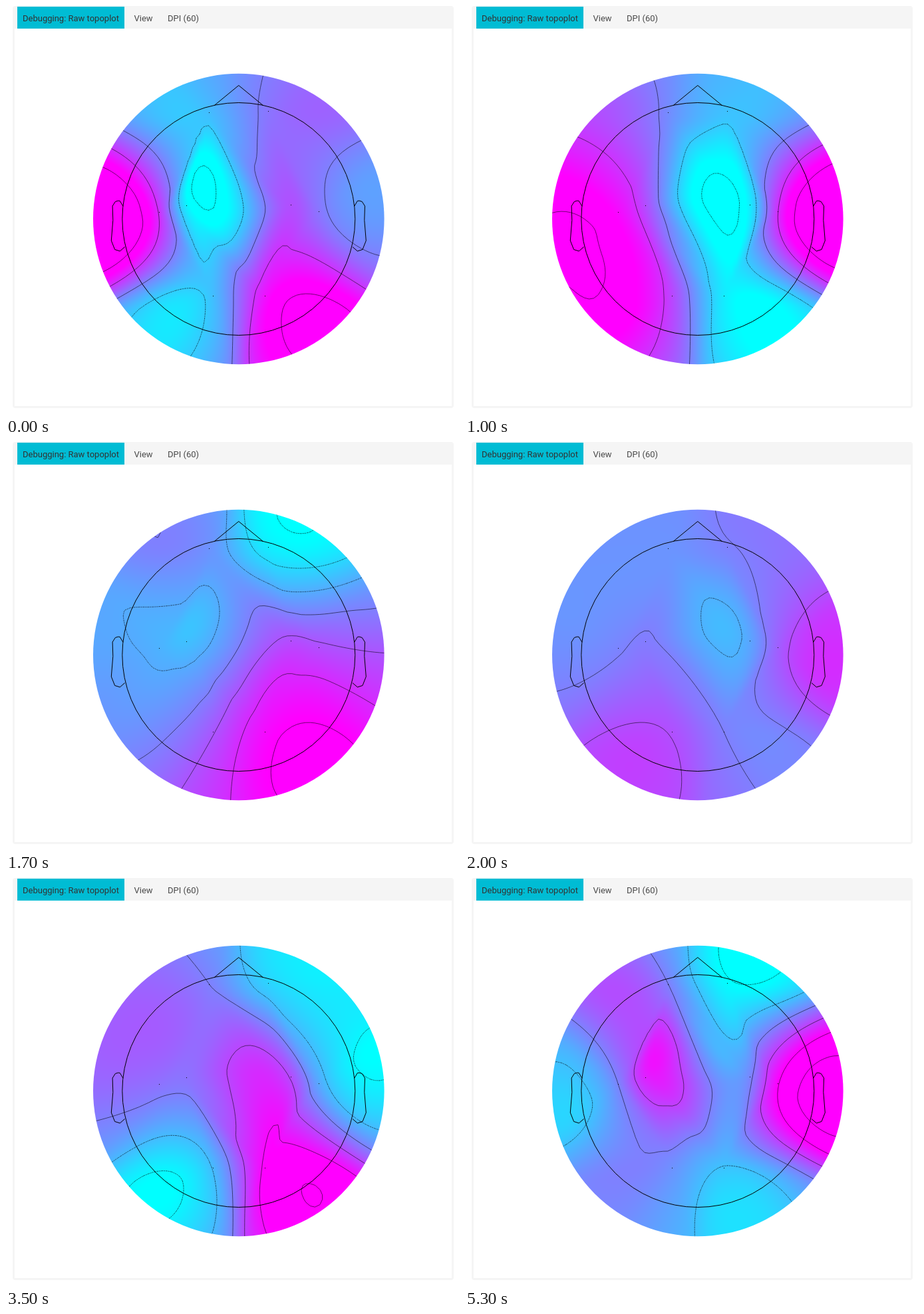
These frames come from a looping animation (681 by 614 pixels, 5400 ms). An HTML page with a canvas:

```html
<!DOCTYPE html>
<html lang="en">
<head>
<meta charset="utf-8">
<title>Raw topoplot</title>
<style>
  html, body { margin: 0; width: 100%; height: 100%; overflow: hidden; background: #fff; }
  .panel { position: absolute; left: 10px; top: 0; width: 663px; height: 605px; border-radius: 4px; background: #f5f5f5; }
  .body { position: absolute; left: 3px; top: 34px; width: 657px; height: 568px; background: #fff; }
  .tab { position: absolute; top: 1px; height: 33px; font: 13px/35px Roboto, sans-serif; color: #4a4a4a; white-space: nowrap; }
  .active { left: 7px; width: 153px; padding-left: 8px; background: #00bcd4; color: #333; }
  canvas { position: absolute; left: 0; top: 0; }
</style>
</head>
<body>
<div class="panel">
  <div class="tab active">Debugging: Raw topoplot</div>
  <div class="tab" style="left:182.5px">View</div>
  <div class="tab" style="left:233px">DPI (60)</div>
  <div class="body"></div>
</div>
<canvas id="stage" width="681" height="614"></canvas>
<script>
const ctx = document.getElementById('stage').getContext('2d');
const CX = 349.8, CY = 320.5, HEAD = 175, SKIRT = 218.8;
const X0 = CX - SKIRT, Y0 = CY - SKIRT, SIZE = 2 * SKIRT, N = 64;

// Sensor pairs: half distance, height, tilt.
const pairs = [[44.5, 159, 1], [78.6, 300, 0.5], [119.8, 310, 0.5], [39, 436.6, 0.1]];
const sensors = pairs.flatMap(([d, y, tilt]) => [[CX + 0.4 - d, y + tilt], [CX + 0.4 + d, y - tilt]]);

// Twelve outer points let the field run on past the sensors.
const RING = 1.1 * HEAD + 145;
const ring = Array.from({ length: 12 }, (_, i) => {
  const a = i * Math.PI / 6;
  return [CX + RING * Math.cos(a), CY + RING * Math.sin(a)];
});
const pts = [...sensors, ...ring];

// Sensor readings (percent of the colour range, left and right in turn) and contour spacing.
const keys = [
  { t: 0,    v: [-24, 4, -46, 19, 28, 5, -24, 42],    step: 30 },
  { t: 1000, v: [-5, -26, 19, -44, 46, 29, 22, -42],  step: 30 },
  { t: 1700, v: [-8, -42, -25, 20, -20, 20, 16, 45],  step: 17 },
  { t: 2300, v: [-8, 40, 28, -50, 17, 3, 21, -45],    step: 22 },
  { t: 3500, v: [0, -32, 5, 21, 5, -14, -22, 49],     step: 23 },
  { t: 4400, v: [38, 12, -34, 7, 32, -47, -13, 15],   step: 38 },
  { t: 5300, v: [0, -48, 37, -3, 0, 48, -7, -26],     step: 25 }
];
const LOOP = 5400, TICK = 100;

// The plot refreshes on most early ticks, later only now and then.
const skipped = [2, 5, 9, 13, 16, 21], late = [35, 39, 44, 48, 53];
const refreshes = n => n <= 23 ? !skipped.includes(n) : late.includes(n);

function circumcircle([ax, ay], [bx, by], [cx, cy]) {
  const d = 2 * ((bx - ax) * (cy - ay) - (by - ay) * (cx - ax));
  const b = (bx - ax) ** 2 + (by - ay) ** 2, c = (cx - ax) ** 2 + (cy - ay) ** 2;
  const ux = ((cy - ay) * b - (by - ay) * c) / d, uy = ((bx - ax) * c - (cx - ax) * b) / d;
  return { x: ax + ux, y: ay + uy, r: Math.hypot(ux, uy) };
}

// Delaunay: keep every triangle whose circumcircle is empty.
function triangulate() {
  const found = [];
  for (let i = 0; i < pts.length; i++)
    for (let j = i + 1; j < pts.length; j++)
      for (let k = j + 1; k < pts.length; k++) {
        const o = circumcircle(pts[i], pts[j], pts[k]), tri = [i, j, k];
        const empty = pts.every((p, n) => tri.includes(n) || Math.hypot(p[0] - o.x, p[1] - o.y) > o.r);
        if (empty) found.push(tri);
      }
  return found;
}
const tris = triangulate();

function bary(tri, x, y) {
  const [a, b, c] = tri.map(i => pts[i]);
  const det = (b[1] - c[1]) * (a[0] - c[0]) + (c[0] - b[0]) * (a[1] - c[1]);
  const u = ((b[1] - c[1]) * (x - c[0]) + (c[0] - b[0]) * (y - c[1])) / det;
  const v = ((c[1] - a[1]) * (x - c[0]) + (a[0] - c[0]) * (y - c[1])) / det;
  return [u, v, 1 - u - v];
}

const links = pts.map((_, i) =>
  [...new Set(tris.filter(t => t.includes(i)).flat())].filter(j => j !== i));

// Cross-edge weights that keep neighbouring patches smooth.
const edgeWeights = tris.map(tri => [0, 1, 2].map(k => {
  const i = (k + 1) % 3, j = (k + 2) % 3;
  const other = tris.find(t => t !== tri && t.includes(tri[i]) && t.includes(tri[j]));
  if (!other) return -0.5;
  const mid = axis => other.reduce((s, p) => s + pts[p][axis], 0) / 3;
  const c = bary(tri, mid(0), mid(1));
  return (2 * c[j] + c[i] - 1) / (2 - 3 * c[i] - 3 * c[j]);
}));

const gridX = i => X0 + SIZE * i / (N - 1);
const gridY = j => Y0 + SIZE * j / (N - 1);
const cells = Array.from({ length: N * N }, (_, n) => {
  const x = gridX(n % N), y = gridY(Math.floor(n / N));
  for (let t = 0; t < tris.length; t++) {
    const b = bary(tris[t], x, y);
    if (Math.min(...b) >= -1e-9) return { t, b };
  }
});

// Gradients with the least bending along all edges.
function gradients(f) {
  const g = pts.map(() => [0, 0]);
  for (let pass = 0; pass < 150; pass++) {
    pts.forEach((p, i) => {
      let xx = 0, xy = 0, yy = 0, sx = 0, sy = 0;
      for (const j of links[i]) {
        const ex = pts[j][0] - p[0], ey = pts[j][1] - p[1], l3 = Math.hypot(ex, ey) ** 3;
        const s = 6 * (f[i] - f[j]) + 2 * (ex * g[j][0] + ey * g[j][1]);
        xx += 4 * ex * ex / l3;
        xy += 4 * ex * ey / l3;
        yy += 4 * ey * ey / l3;
        sx += s * ex / l3;
        sy += s * ey / l3;
      }
      const det = xx * yy - xy * xy;
      g[i] = [(xy * sy - yy * sx) / det, (xy * sx - xx * sy) / det];
    });
  }
  return g;
}

// Clough-Tocher cubic on one triangle.
function makePatch(tri, weights, values, grads) {
  const f = tri.map(i => values[i]);
  const e = tri.map((p, i) => tri.map(q => f[i] +
    (grads[p][0] * (pts[q][0] - pts[p][0]) + grads[p][1] * (pts[q][1] - pts[p][1])) / 3));
  const m = f.map((_, i) => (e[i][0] + e[i][1] + e[i][2]) / 3);
  const n = weights.map((w, k) => {
    const i = (k + 1) % 3, j = (k + 2) % 3;
    return (w * (-f[i] + 3 * e[i][j] - 3 * e[j][i] + f[j])
      - f[i] + 2 * e[i][j] - e[j][i] + m[i] + m[j]) / 2;
  });
  const q = m.map((v, i) => (v + n[(i + 1) % 3] + n[(i + 2) % 3]) / 3);
  const z = (q[0] + q[1] + q[2]) / 3;
  return b => {
    const low = Math.min(b[0], b[1], b[2]), r = 3 * low;
    let w = r * r * r * z;
    for (let k = 0; k < 3; k++) {
      const i = (k + 1) % 3, j = (k + 2) % 3;
      const a = b[k] - low, c = b[i] - low, d = b[j] - low;
      w += a * a * a * f[k] + 3 * a * a * (r * m[k] + c * e[k][i] + d * e[k][j])
        + 3 * a * r * r * q[k] + 6 * c * d * r * n[k];
    }
    return w;
  };
}

// Each outer point takes the mean of the sensors it is linked to.
function withRing(v) {
  const outer = ring.map((_, i) => {
    const near = links[v.length + i].filter(j => j < v.length);
    return near.reduce((s, j) => s + v[j], 0) / near.length;
  });
  return [...v, ...outer];
}

function makeField(v) {
  const values = withRing(v), grads = gradients(values);
  const patches = tris.map((tri, t) => makePatch(tri, edgeWeights[t], values, grads));
  return cells.map(c => patches[c.t](c.b));
}

const BOX = { x: 130, y: 101, w: 440, h: 440 };
const buffer = document.createElement('canvas');
buffer.width = BOX.w;
buffer.height = BOX.h;
const bufferCtx = buffer.getContext('2d');
const image = bufferCtx.createImageData(BOX.w, BOX.h);

function sample(pos, start) {
  const u = Math.max(0, Math.min(N - 1, (pos + 0.5 - start) / SIZE * N - 0.5));
  const i = Math.min(N - 2, Math.floor(u));
  return [i, u - i];
}

function paintField(field) {
  for (let y = 0, o = 0; y < BOX.h; y++) {
    const [j, v] = sample(BOX.y + y, Y0);
    for (let x = 0; x < BOX.w; x++, o += 4) {
      const [i, u] = sample(BOX.x + x, X0), n = j * N + i;
      const top = field[n] * (1 - u) + field[n + 1] * u;
      const low = field[n + N] * (1 - u) + field[n + N + 1] * u;
      const c = Math.max(0, Math.min(1, 0.5 + (top * (1 - v) + low * v) / 100));
      image.data[o] = 255 * c;
      image.data[o + 1] = 255 * (1 - c);
      image.data[o + 2] = image.data[o + 3] = 255;
    }
  }
  bufferCtx.putImageData(image, 0, 0);
  ctx.drawImage(buffer, BOX.x, BOX.y);
}

function traceLevel(field, level) {
  const corners = [[0, 0], [1, 0], [1, 1], [0, 1]];
  ctx.beginPath();
  for (let j = 0; j < N - 1; j++) {
    for (let i = 0; i < N - 1; i++) {
      const hits = [];
      corners.forEach(([ax, ay], k) => {
        const [bx, by] = corners[(k + 1) % 4];
        const a = field[(j + ay) * N + i + ax] - level;
        const b = field[(j + by) * N + i + bx] - level;
        if (a > 0 === b > 0) return;
        const s = a / (a - b);
        hits.push([gridX(i + ax + (bx - ax) * s), gridY(j + ay + (by - ay) * s)]);
      });
      for (let k = 0; k + 1 < hits.length; k += 2) {
        ctx.moveTo(...hits[k]);
        ctx.lineTo(...hits[k + 1]);
      }
    }
  }
  ctx.stroke();
}

function line(points) {
  ctx.beginPath();
  points.forEach(p => ctx.lineTo(...p));
  ctx.stroke();
}

function circle(r) {
  ctx.beginPath();
  ctx.arc(CX, CY, r, 0, 2 * Math.PI);
}

const ear = [[174, 19.4], [178.5, 27.1], [181.3, 27.4], [185.5, 26.1], [189.7, 19.4],
  [189, -1.9], [191.5, -32.6], [186.2, -46], [178.5, -48.4], [171.2, -42]];

function drawHead() {
  ctx.lineWidth = 1;
  circle(HEAD);
  ctx.stroke();
  line([[CX - 36.5, CY - 171], [CX, CY - 201], [CX + 36.5, CY - 171]]);
  for (const side of [-1, 1]) line(ear.map(([x, y]) => [CX + side * x, CY - y]));
  ctx.fillStyle = '#000';
  for (const [x, y] of sensors) ctx.fillRect(Math.floor(x), Math.floor(y), 1, 1);
}

function stateAt(t) {
  const k = keys.findLastIndex(key => key.t <= t);
  const a = keys[k], b = keys[k + 1] || a;
  const s = a === b ? 0 : (t - a.t) / (b.t - a.t);
  const mix = (p, q) => p + (q - p) * s;
  return { v: a.v.map((p, i) => mix(p, b.v[i])), step: mix(a.step, b.step) };
}

function draw(t) {
  const { v, step } = stateAt(t), field = makeField(v);
  ctx.clearRect(0, 0, 681, 614);
  ctx.strokeStyle = '#000';
  ctx.save();
  circle(SKIRT);
  ctx.clip();
  paintField(field);
  ctx.lineWidth = 0.55;
  for (let k = -9; k <= 9; k++) {
    ctx.setLineDash(k < 0 ? [2, 0.9] : []);
    traceLevel(field, k * step);
  }
  ctx.restore();
  drawHead();
}

let shown = -1;
const start = performance.now();
function frame() {
  let n = Math.floor((performance.now() - start) % LOOP / TICK);
  while (!refreshes(n)) n--;
  if (n !== shown) draw((shown = n) * TICK);
  requestAnimationFrame(frame);
}
frame();
</script>
</body>
</html>
```
